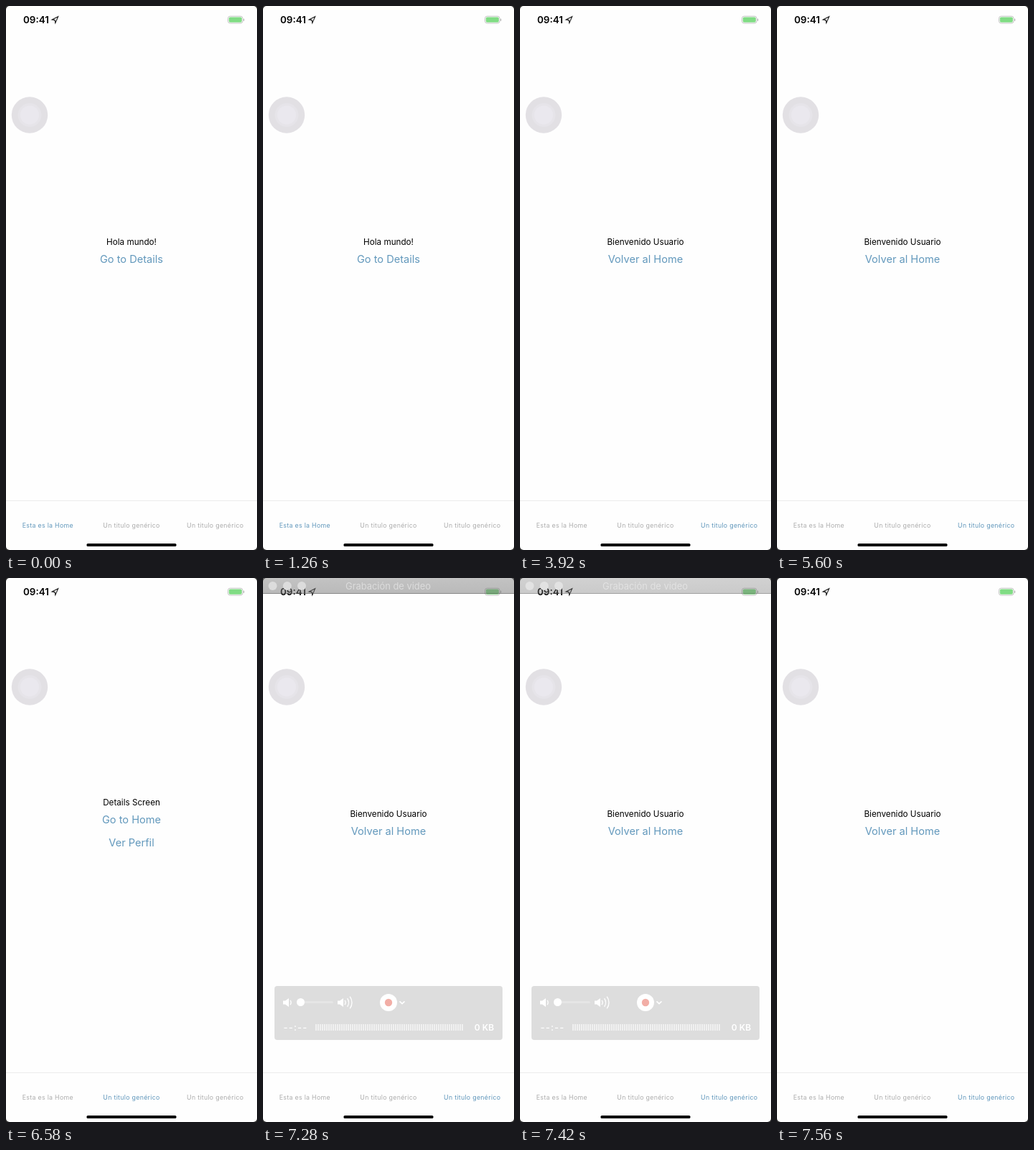
An HTML page with a canvas for the animation above (7630 ms loop, 350 by 756 pixels).

```html
<!DOCTYPE html>
<html lang="es">
<head>
<meta charset="utf-8">
<title>Tab navigation</title>
<style>
html, body { margin: 0; width: 100%; height: 100%; overflow: hidden; background: #fff; }
canvas { display: block; width: 350px; height: 756px; }
</style>
</head>
<body>
<canvas id="stage"></canvas>
<script>
const W = 350, H = 756, LOOP = 7630, TICK = 70;
const FONT = 'Inter, "Liberation Sans", sans-serif';
const BLUE = '#6298bc', GRAY = '#adadad';
const OVERLAY_IN = 7280, OVERLAY_OUT = 7560;

const canvas = document.getElementById('stage');
const ctx = canvas.getContext('2d');
const dpr = window.devicePixelRatio || 1;
canvas.width = W * dpr;
canvas.height = H * dpr;

const TABS = ['Esta es la Home', 'Un titulo genérico', 'Un titulo genérico'];
const SCREENS = [
  { title: 'Hola mundo!', y: 332, buttons: ['Go to Details'] },
  { title: 'Details Screen', y: 316, buttons: ['Go to Home', 'Ver Perfil'] },
  { title: 'Bienvenido Usuario', y: 332, buttons: ['Volver al Home'] }
];
// [start ms, screen index]
const ROUTE = [[0, 0], [1750, 1], [2660, 2], [6160, 0], [6580, 1], [6860, 2]];

function text(str, x, y, size, color, { weight = 400, spacing = 0, align = 'center' } = {}) {
  ctx.font = `${weight} ${size}px ${FONT}`;
  ctx.letterSpacing = spacing + 'px';
  ctx.textAlign = align;
  ctx.fillStyle = color;
  ctx.fillText(str, x, y);
}

function box(x, y, w, h, r, color) {
  ctx.fillStyle = color;
  ctx.beginPath();
  ctx.roundRect(x, y, w, h, r);
  ctx.fill();
}

function disc(x, y, r, color) {
  ctx.fillStyle = color;
  ctx.beginPath();
  ctx.arc(x, y, r, 0, Math.PI * 2);
  ctx.fill();
}

function path(points, close) {
  ctx.beginPath();
  points.forEach(([x, y]) => ctx.lineTo(x, y));
  if (close) ctx.closePath();
}

function stroke(color, width) {
  ctx.strokeStyle = color;
  ctx.lineWidth = width;
  ctx.stroke();
}

function drawStatusBar() {
  text('09:41', 24, 24, 13.4, '#000', { weight: 600, align: 'left' });
  path([[72.7, 14.7], [64.2, 19], [68.2, 19.6], [68.8, 23.6]], true);
  stroke('#111', 1.1);
  ctx.beginPath();
  ctx.roundRect(309.5, 14.2, 20.5, 9.8, 3);
  stroke('#c4c4c4', 1);
  box(310.8, 15.5, 18, 7.2, 1.8, '#80dc84');
  box(331, 17.5, 1.2, 3.4, 0.6, '#b5b5b5');
}

function drawScreen(index) {
  const { title, y, buttons } = SCREENS[index];
  text(title, W / 2, y, 11.7, '#000');
  buttons.forEach((label, i) =>
    text(label, W / 2, y + 24.7 + i * 32, 14.6, BLUE));

  ctx.fillStyle = '#ececec';
  ctx.fillRect(0, 687, W, 1);
  TABS.forEach((label, i) =>
    text(label, W * (2 * i + 1) / 6, 725.3, 8.8, i === index ? BLUE : GRAY, { spacing: 0.3 }));
}

function drawTouchButton() {
  disc(33, 151.5, 25.2, '#e2e0e4');
  disc(33, 151.5, 16.5, '#e6e4e9');
  disc(33, 151.5, 13, '#eae8ee');
}

function drawSpeaker(x, y, waves) {
  ctx.fillStyle = '#fff';
  path([[x, y - 2.5], [x + 3, y - 2.5], [x + 8, y - 6], [x + 8, y + 6], [x + 3, y + 2.5], [x, y + 2.5]], true);
  ctx.fill();
  for (let i = 0; i < waves; i++) {
    ctx.beginPath();
    ctx.arc(x + 6, y, 5 + i * 4.5, -0.65, 0.65);
    stroke('#fff', 1.3);
  }
}

function drawTitleBar(fade) {
  const alpha = 0.48 - 0.18 * fade;
  const g = ctx.createLinearGradient(0, 0, 0, 22);
  g.addColorStop(0, `rgba(130,130,130,${alpha})`);
  g.addColorStop(1, `rgba(110,110,110,${alpha})`);
  ctx.fillStyle = g;
  ctx.fillRect(0, 0, W, 22);
  ctx.fillStyle = `rgba(60,60,60,${alpha * 0.8})`;
  ctx.fillRect(0, 21, W, 1);
  const light = fade > 0.5 ? '#e2e2e2' : '#dcdcdc';
  [13.5, 33.8, 54].forEach(x => disc(x, 11, 6, light));
  text('Grabación de video', 174.5, 16.3, 12.9, light);
}

function drawRecorder() {
  box(16, 567, 318, 75, 4, '#dddddd');

  drawSpeaker(28, 590, 1);
  box(52, 588, 46, 3, 1.5, '#e5e5e5');
  disc(52.5, 589.5, 5.5, '#fff');
  drawSpeaker(104, 590, 3);

  disc(175, 590, 12, '#fff');
  disc(175, 590, 5.2, '#f2aea6');
  path([[190.5, 588.3], [194, 591.6], [197.5, 588.3]]);
  stroke('#fff', 1.6);

  text('--:--', 28.5, 629, 13, '#fff', { weight: 500, spacing: 1.2, align: 'left' });
  ctx.fillStyle = '#f0f0f0';
  for (let x = 73; x < 278; x += 3) ctx.fillRect(x, 620, 2, 9);
  text('0 KB', 308.5, 629, 12, '#fff', { weight: 600 });
}

function render(t) {
  ctx.setTransform(dpr, 0, 0, dpr, 0, 0);
  ctx.fillStyle = '#2b2b2b';
  ctx.fillRect(0, 0, W, H);
  box(0, 0, W, H, 5, '#fefefe');

  const [, screen] = ROUTE.filter(([start]) => t >= start).pop();
  drawStatusBar();
  drawTouchButton();
  drawScreen(screen);
  box(112.5, 747, 125, 4, 1.6, '#000');

  if (t >= OVERLAY_IN && t < OVERLAY_OUT) {
    const step = Math.floor((t - OVERLAY_IN) / TICK);
    drawTitleBar(step / 3);
    drawRecorder();
  }
}

const begin = performance.now();
function loop() {
  render((performance.now() - begin) % LOOP);
  requestAnimationFrame(loop);
}
loop();
</script>
</body>
</html>
```
